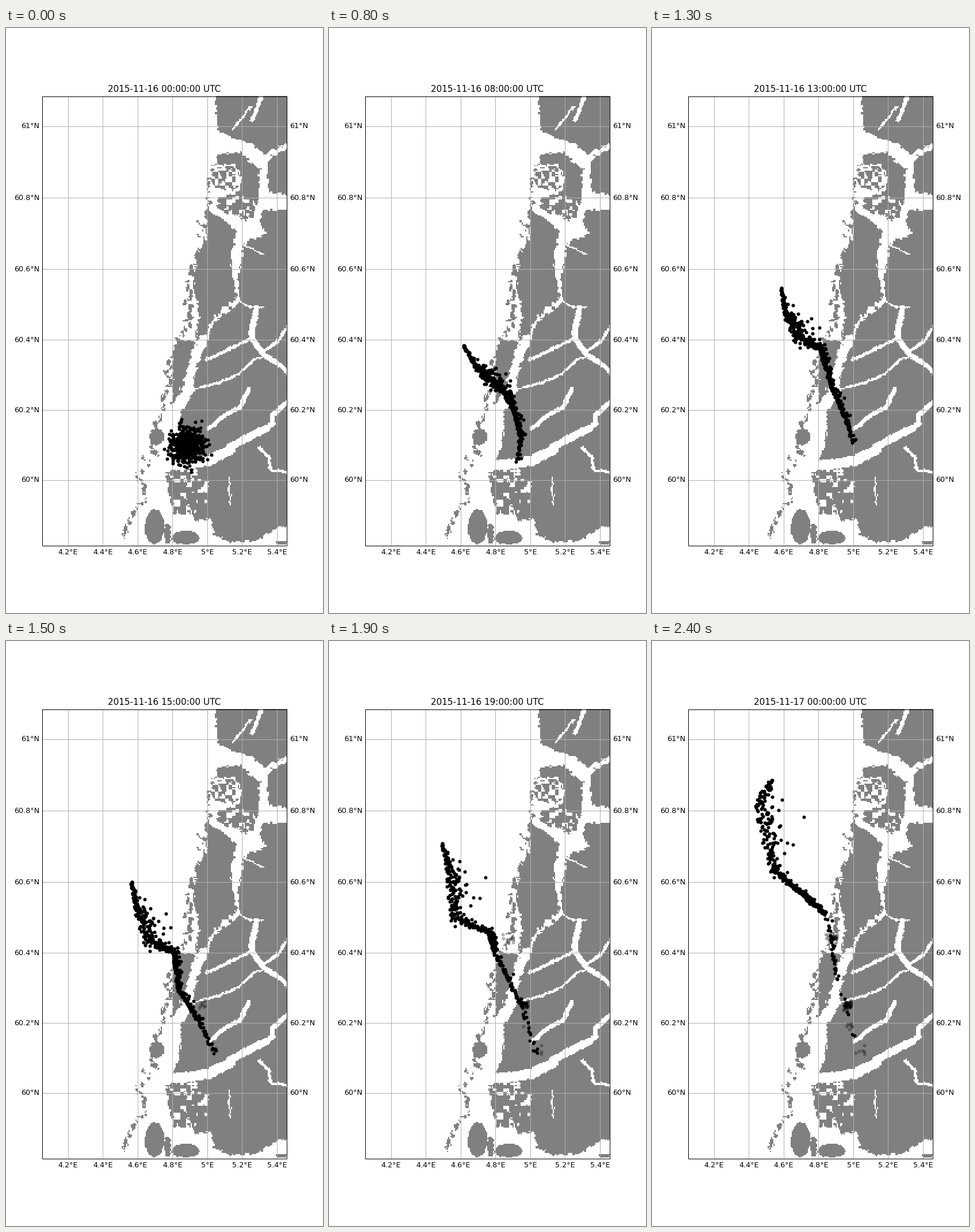
A matplotlib script for the animation above (2.5 s loop, 551 by 1017 pixels).

```python
import numpy as np
import matplotlib.pyplot as plt
from matplotlib.animation import FuncAnimation
from matplotlib.path import Path

WIDTH, HEIGHT, DPI = 551, 1017, 128
PT = 72 / DPI  # points per pixel
LEFT, RIGHT, TOP, BOTTOM = 63, 488, 119, 900
CELL, ROWS, COLS = 2, 391, 213
rng = np.random.RandomState(11)

# ---------- land mask on a coarse grid ----------
gx, gy = np.meshgrid(LEFT + CELL * (np.arange(COLS) + .5),
                     TOP - 1 + CELL * (np.arange(ROWS) + .5))
land = np.zeros((ROWS, COLS), bool)


def noise(size):
    shape = (ROWS // size + 1, COLS // size + 1)
    return np.kron(rng.normal(size=shape), np.ones((size, size)))[:ROWS, :COLS]


# shaken coordinates make the coasts ragged
sx, sy = (g + 1.1 * noise(2) + 1.1 * noise(4) for g in (gx, gy))
blotch = .3 * noise(2) + noise(3) + noise(5)
blotch = blotch.ravel().argsort().argsort().reshape(land.shape) / land.size


def fill(*pts):
    path = Path(np.reshape(pts, (-1, 2)))
    grid = np.column_stack([sx.ravel(), sy.ravel()])
    land[path.contains_points(grid).reshape(land.shape)] = True


def oval(x, y, rx, ry, shake=.5):
    px, py = gx + shake * (sx - gx), gy + shake * (sy - gy)
    return ((px - x) / rx) ** 2 + ((py - y) / ry) ** 2 < 1


def fjord(width, *pts):
    """Cut a channel along a line of points."""
    p = np.reshape(pts, (-1, 2)).astype(float)
    x, y = (gx + sx) / 2, (gy + sy) / 2
    for a, d in zip(p, np.diff(p, axis=0)):
        k = np.clip(((x - a[0]) * d[0] + (y - a[1]) * d[1]) / (d @ d), 0, 1)
        land[np.hypot(x - a[0] - k * d[0], y - a[1] - k * d[1]) < width / 2] = False


# mainland and its fjords
fill(447, 317, 495, 317, 495, 866, 470, 868, 440, 890, 390, 894, 362, 880,
     356, 852, 330, 857, 322, 845, 292, 846, 282, 808, 280, 772, 300, 728,
     305, 672, 326, 628, 330, 592, 362, 512, 406, 478, 402, 440, 410, 405,
     412, 376, 452, 358, 442, 340)
land[oval(310, 800, 45, 48) & (blotch < .15)] = False
fjord(4, 402, 440, 403, 470, 416, 482, 446, 486)
fjord(10, 436, 487, 428, 522, 428, 540, 448, 568)
fjord(9, 448, 568, 472, 583, 490, 599)
fjord(6, 442, 566, 472, 545, 490, 519)
fjord(6, 426, 540, 380, 562, 348, 577)
fjord(4, 450, 570, 432, 576, 404, 602, 370, 616, 320, 630)
fjord(8, 352, 696, 380, 674, 408, 658, 422, 628)
fjord(18, 280, 762, 355, 752, 392, 731)
fjord(14, 385, 733, 405, 720, 450, 697)
fjord(9, 445, 700, 464, 688, 464, 672, 490, 650)
fjord(5, 440, 730, 457, 745, 460, 768, 490, 773)
fjord(3, 412, 376, 446, 394)
fjord(2.5, 388, 782, 390, 828)

# northern blocks
fill(366, 110, 495, 110, 495, 198, 462, 212, 448, 222, 430, 203, 404, 194, 368, 178)
fjord(7, 445, 114, 437, 138, 428, 160)
fjord(4, 426, 136, 395, 175)
fill(495, 207, 460, 224, 453, 238, 457, 286, 495, 290)
fill(365, 222, 410, 214, 420, 230, 443, 245, 440, 286, 431, 328, 416, 335,
     368, 312, 370, 294, 404, 285, 411, 262, 398, 240, 364, 236)
land[oval(402, 312, 34, 20) & (blotch < .25)] = False
land |= oval(383, 262, 26, 22) & (blotch < .45)

# western islands
fill(351, 317, 386, 338, 402, 352, 391, 400, 396, 440, 400, 470, 366, 493,
     348, 530, 328, 545, 336, 490, 326, 450, 334, 390, 352, 368, 350, 345)
land |= oval(382, 492, 20, 18) & (blotch < .5)
fill(297, 540, 330, 546, 316, 590, 300, 640, 288, 653, 290, 610, 289, 575)
for isle in ((262, 711, 13, 14), (258, 867, 17, 30), (281, 879, 6, 18), (312, 886, 24, 12),
             (479, 895, 10, 3)):
    land |= oval(*isle)

# skerries strewn along the outer coast
for y in np.linspace(238, 885, 80):
    x = np.interp(y, [240, 350, 430, 505, 620, 670, 743, 815, 870],
                  [356, 348, 322, 314, 278, 268, 247, 235, 210])
    land |= oval(x + rng.normal(0, 5), y, rng.uniform(1, 6), rng.uniform(1.5, 7), 1)

# ---------- drifting particles ----------
N = 500
HOURS = np.array([0, 4, 8, 11, 15, 19, 24])
along, side, jitter = rng.normal(size=(3, N))
rank = along.argsort().argsort() / (N - 1)
skew = (np.exp(.6 * side) - 1) / .6

# paths of a few lead particles, from the tip of the plume to its tail
KNOTS = [0, .1, .33, .5, .75, .95, 1]
PATHS = np.array([
    [(259, 624), (233, 552), (228, 489), (217, 419), (195, 353), (206, 243)],
    [(283, 654), (255, 587), (239, 530), (228, 462), (211, 395), (188, 285)],
    [(300, 676), (283, 612), (265, 560), (252, 523), (220, 482), (213, 400)],
    [(311, 688), (305, 632), (295, 580), (292, 540), (278, 506), (262, 440)],
    [(327, 707), (322, 665), (322, 635), (300, 605), (288, 540), (303, 476)],
    [(335, 735), (333, 710), (337, 695), (335, 660), (336, 637), (323, 590)],
    [(332, 748), (327, 755), (336, 732), (363, 718), (360, 723), (354, 698)]])


def plume(i):
    """Particle places at HOURS[i]; the offshore part widens with time."""
    if i == 0:
        return np.column_stack([314 + 15 * (.6 * along + .8 * side),
                                725 + 15 * (.8 * along - .6 * side)])
    x, y = (np.interp(rank, KNOTS, PATHS[:, i - 1, k]) for k in (0, 1))
    center = .4 - .01 * HOURS[i]
    spread = 2.2 + (4 + .1 * HOURS[i]) * np.exp(-((rank - center) / .17) ** 2)
    spread *= np.minimum(1, .3 + 10 * rank)
    return np.column_stack([x + spread * skew, y + .8 * spread * jitter])


poses = np.array([plume(i) for i in range(len(HOURS))])
slopes = np.gradient(poses, HOURS, axis=0)


def drift(hour):
    i = min(np.searchsorted(HOURS, hour, side="right") - 1, len(HOURS) - 2)
    span = HOURS[i + 1] - HOURS[i]
    k = (hour - HOURS[i]) / span
    return ((1 + 2 * k) * (1 - k) ** 2 * poses[i] + k * (1 - k) ** 2 * span * slopes[i]
            + k * k * (3 - 2 * k) * poses[i + 1] + k * k * (k - 1) * span * slopes[i + 1])


# most of the tail ends up on the shore of the nearest bay
BAYS = np.array([(340, 633), (314, 517), (345, 667), (363, 711)])
strand = np.where((rank > .72) & (rng.uniform(size=N) < .7), rng.randint(15, 25, N), 99)
beach = np.zeros((N, 2))
for n in np.flatnonzero(strand < 99):
    gap = np.hypot(*(BAYS - drift(strand[n])[n]).T)
    beach[n] = BAYS[gap.argmin()] + rng.normal(0, (5, 4))

# ---------- stage ----------
plt.rcParams["font.family"] = "DejaVu Sans"
fig = plt.figure(figsize=(WIDTH / DPI, HEIGHT / DPI), dpi=DPI, facecolor="white")
ax = fig.add_axes([0, 0, 1, 1])
ax.axis("off")
shade = np.where(land, 128, 255).astype(np.uint8)
ax.imshow(np.dstack([shade] * 3), interpolation="nearest", aspect="auto", zorder=1,
          extent=(LEFT, LEFT + CELL * COLS, TOP - 1 + CELL * ROWS, TOP - 1))
ax.set_xlim(0, WIDTH)
ax.set_ylim(HEIGHT, 0)

GRID = dict(color="#b0b0b0", lw=PT, zorder=2)
LABEL = dict(fontsize=12.78 * PT)
PAD = 5


def mercator(lat):
    return np.degrees(np.arcsinh(np.tan(np.radians(lat))))


for i in range(7):
    x = 107.9 + 60.5 * i
    ax.plot([x, x], [TOP, BOTTOM], **GRID)
    ax.text(x, BOTTOM + PAD, f"{4.2 + .2 * i:.3g}°E", ha="center", va="top", **LABEL)
for i in range(6):
    lat = 61 - .2 * i
    y = 170.6 + 303 * (mercator(61) - mercator(lat))
    ax.plot([LEFT, RIGHT], [y, y], **GRID)
    for x, side_of in ((LEFT - PAD, "right"), (RIGHT + PAD, "left")):
        ax.text(x, y, f"{lat:.3g}°N", ha=side_of, va="center", **LABEL)
ax.plot([LEFT, RIGHT, RIGHT, LEFT, LEFT], [TOP, TOP, BOTTOM, BOTTOM, TOP], color="black",
        lw=PT, zorder=6, solid_joinstyle="miter", solid_capstyle="projecting")
title = ax.text((LEFT + RIGHT) / 2, 111, "", ha="center", va="baseline",
                fontsize=15.33 * PT)

DOT = dict(s=(6 * PT) ** 2, color="black", linewidths=0)
beached = ax.scatter([], [], alpha=.3, zorder=4, **DOT)
floating = ax.scatter([], [], zorder=5, **DOT)


def update(hour):
    day, h = divmod(hour, 24)
    title.set_text(f"2015-11-{16 + day} {h:02d}:00:00 UTC")
    floating.set_offsets(drift(hour)[strand > hour])
    beached.set_offsets(beach[strand <= hour])
    return floating, beached, title


anim = FuncAnimation(fig, update, frames=25, interval=100, init_func=lambda: update(0),
                     repeat=True, repeat_delay=0, blit=False)
plt.show()
```
